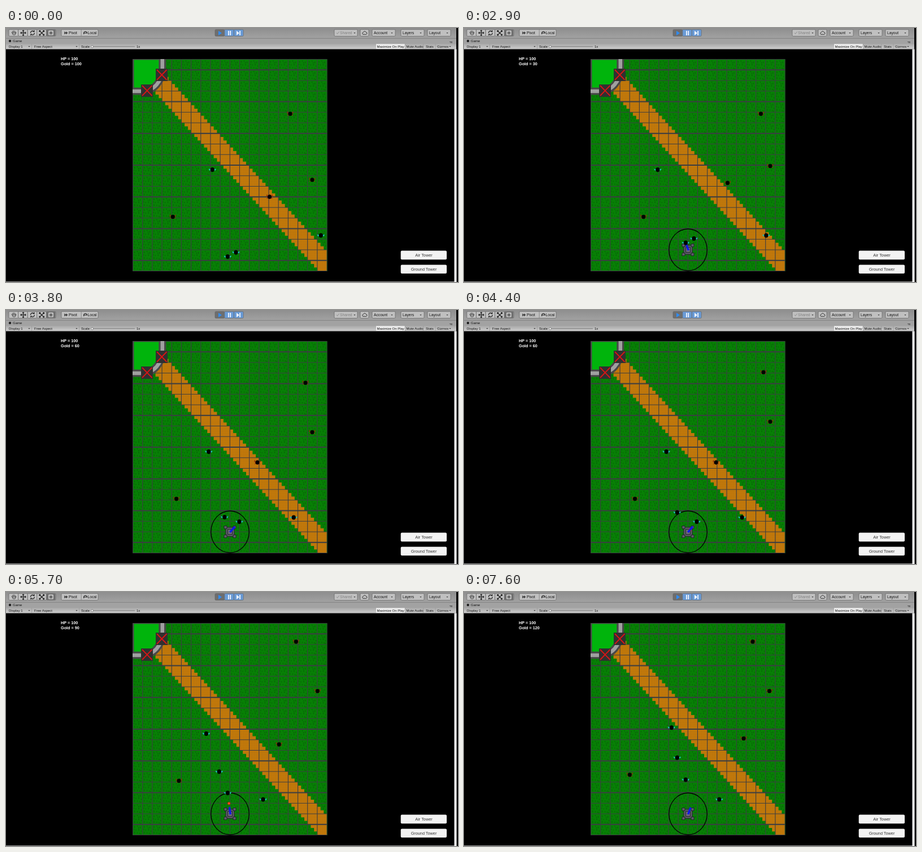
These frames come from a looping animation (800x450 px, 8000 ms). An HTML page:

```html
<!DOCTYPE html>
<html>
<head>
<meta charset="utf-8">
<style>
  html, body { margin: 0; width: 100%; height: 100%; overflow: hidden; background: #000; }
  svg { display: block; width: 800px; height: 450px; font: 6px "Liberation Sans", Arial, sans-serif; }
  .top { font-size: 6.7px; }
  .btn { fill: #c0c0c0; stroke: #636363; stroke-width: .7; }
  .on { fill: #6e6e6e; }
  .lit { fill: #6a9bd6; }
  .icon { fill: none; stroke: #222; stroke-width: 1.2; }
  .hud { font-size: 7.25px; font-weight: bold; fill: #fff; }
  .label { font-size: 7.3px; fill: #323232; text-anchor: middle; }
</style>
</head>
<body>
<svg viewBox="0 0 800 450">
  <defs>
    <linearGradient id="bar" x2="0" y2="1"><stop stop-color="#8e8e8e"/><stop offset="1" stop-color="#a2a2a2"/></linearGradient>
    <linearGradient id="strip" x2="0" y2="1"><stop stop-color="#a8a8a8"/><stop offset="1" stop-color="#cecece"/></linearGradient>
    <pattern id="grass" x="224.5" y="55.5" width="17.18" height="18.75" patternUnits="userSpaceOnUse">
      <rect width="18" height="19" fill="#078005"/>
      <path d="M3 3v3M8 2v2M13 4v3M5.5 9v2M10.5 8v3M15 11v2M3 13v3M8 14v2M12 15v2M10 5v2M2 8v2M14 16v2" stroke="#065207" stroke-width=".9"/>
    </pattern>
    <pattern id="dirt" x="224.5" y="55.5" width="2.86" height="3.12" patternUnits="userSpaceOnUse">
      <rect width="3" height="4" fill="#c47a0a"/>
      <path d="M1 0v2" stroke="#a8680c" stroke-width=".8"/>
    </pattern>
    <clipPath id="field"><rect x="224" y="55" width="344.6" height="376"/></clipPath>
    <g id="flyer">
      <path d="M-6.8-1.6L-3-1V1.6L-5.5 1.2ZM6.8-1.6L3-1V1.6L5.5 1.2Z" fill="#1cc0bc"/>
      <ellipse rx="3.6" ry="4" fill="#000"/>
    </g>
    <g id="walker">
      <path d="M-2.5 0L-5-1.2L-4.4-4M2.5 0L5-1.2L4.4-4M-2.5 1.5L-4.8 3M2.5 1.5L4.8 3" fill="none" stroke="#94290c" stroke-width="1.2"/>
      <ellipse rx="3.5" ry="3.7" fill="#000"/>
    </g>
  </defs>

  <rect width="800" height="450" fill="#000"/>
  <path d="M0 449h797v1H0z" fill="#999"/>

  <!-- editor bars -->
  <rect width="797" height="18.2" fill="url(#bar)"/>
  <rect y="18.2" width="797" height="10" fill="#a2a2a2"/>
  <path d="M0 18.2H797" stroke="#868686" stroke-width=".7"/>
  <rect y="28" width="797" height="9.5" fill="url(#strip)"/>
  <path d="M0 37.3H797" stroke="#777" stroke-width=".6"/>
  <path d="M793.5 37.5h4V450h-4z" fill="#fff"/>
  <rect x="655" y="28.3" width="51" height="8.7" fill="#ececec"/>
  <path d="M706.3 28v9M738.5 28v9M760 28v9M45.5 28v9M129.5 28v9" stroke="#999" stroke-width=".7"/>

  <g id="buttons"></g>
  <path class="on" d="M71.5 3h16v11h-16z"/>
  <g class="icon">
    <path d="M11 9L10 7M12 8V5M14 8V4.5M16 8V5.5M17.5 9V7M11 9L12.5 12H16L17.5 9Z" stroke-width=".8"/>
    <path d="M26 8.7H35M30.5 4.2V13.2M27.5 7L26 8.7L27.5 10.4M33.5 7L35 8.7L33.5 10.4M29 5.5L30.5 4L32 5.5M29 12L30.5 13.4L32 12"/>
    <path d="M43.5 9A3.5 3.5 0 0 1 49 5.8M50.3 8.5A3.5 3.5 0 0 1 45 11.7M47.5 6.5H50V4M46.3 11H43.7V13.2"/>
    <path d="M59.5 5L67 12.5M67 5L59.5 12.5M59 7V4.5H61.5M65 4.5H67.5V7M59 10.5V13H61.5M65 13H67.5V10.5"/>
    <path d="M76 5.3H83V12H76Z" stroke="#eee"/>
    <path d="M104 6.5V11M107 6.5V11M104 8.7H109M138 11A3 3 0 1 1 143.5 9H138"/>
    <path d="M632 11.3A2 2 0 0 1 632.5 7.5A2.4 2.4 0 0 1 637 7.4A2 2 0 0 1 637.5 11.3Z" stroke-width=".9"/>
    <path d="M585 8.5L586.5 10.5L589.5 6.5" stroke="#888" stroke-width=".9"/>
  </g>
  <path d="M376 5L382 9L376 13Z" fill="#2f8cf5"/>
  <path d="M393 5h1.8v8H393zM396.3 5h1.8v8h-1.8zM408 5L413 9L408 13ZM413.3 5h1.7v8h-1.7z" fill="#f4f8ff"/>
  <path d="M133.2 2.5V14.5" stroke="#777" stroke-width=".7"/>
  <path d="M153 33H228" stroke="#777" stroke-width="1"/>
  <circle cx="152.5" cy="33" r="2" fill="#eee" stroke="#555" stroke-width=".6"/>
  <circle cx="7" cy="23" r="2.2" fill="#222"/>
  <path d="M785 24.5H790M786.5 26H790" stroke="#333" stroke-width=".7"/>
  <g id="arrows"></g>
  <g class="top" fill="#111">
    <text x="111" y="11.2">Pivot</text><text x="144.5" y="11.2">Local</text>
    <text x="591" y="11.2" fill="#818181">Shared</text>
    <text x="651" y="11.2">Account</text><text x="702" y="11.2">Layers</text><text x="749" y="11.2">Layout</text>
  </g>
  <g fill="#111">
    <text x="12" y="25.3">Game</text><text x="5" y="34.6">Display 1</text>
    <text x="50" y="34.6">Free Aspect</text><text x="133" y="34.6">Scale</text><text x="231" y="34.6">1x</text>
    <text x="656.5" y="34.6">Maximize On Play</text><text x="708.5" y="34.6">Mute Audio</text>
    <text x="743" y="34.6">Stats</text><text x="763" y="34.6">Gizmos</text>
  </g>

  <!-- map -->
  <g clip-path="url(#field)">
    <rect x="224" y="55" width="345" height="376" fill="url(#grass)"/>
    <path id="road" fill="url(#dirt)"/>
    <g fill="none" stroke="#3b3d42">
      <path id="grid" stroke-width="1.1"/>
      <path id="seams" stroke-width="1.8"/>
    </g>
    <path d="M220 50H276.8V70C276.8 95 262 112 240 112H220Z" fill="#00b40c" stroke="#484848" stroke-width="13"/>
    <path d="M276.8 50V70C276.8 95 262 112 240 112H220" fill="none" stroke="#a0a0a0" stroke-width="6.5"/>
    <path d="M265 72h21v22h-21zM239 100h21v22h-21z" fill="#303030"/>
    <path d="M267 74L284.5 92M284.5 74L267 92M241 102L258.5 120M258.5 102L241 120" stroke="#dc1414" stroke-width="1.8"/>
  </g>

  <g id="tower">
    <ellipse cx="396.5" cy="393" rx="33.7" ry="37" fill="none" stroke="#000" stroke-width="1.3"/>
    <g fill="#5b5b66" stroke="#23232b" stroke-width="1">
      <path d="M389 385h15v16h-15z"/>
      <path d="M386 382.5h5v5h-5zM402 382.5h5v5h-5zM386 398.5h5v5h-5zM402 398.5h5v5h-5z"/>
      <path d="M392.5 388.5h8v9h-8z" fill="#6c6878"/>
    </g>
    <g id="shot"><circle r="2.6" fill="#e02010"/><circle r="1" fill="#ffb030"/></g>
    <path id="gun" d="M-1.8 1V-12H1.8V1Z" fill="#1018e8"/>
  </g>
  <g id="units"></g>

  <text class="hud" x="97" y="56.8">HP = 100</text>
  <text class="hud" x="97" y="66.3" id="gold"></text>
  <rect x="698.7" y="394.6" width="81.3" height="15.6" rx="2" fill="#f3f3f3"/>
  <rect x="698.7" y="419.4" width="81.3" height="15.6" rx="2" fill="#f3f3f3"/>
  <text class="label" x="739.5" y="405">Air Tower</text>
  <text class="label" x="739.5" y="429.8">Ground Tower</text>
</svg>
<script>
const $ = id => document.getElementById(id);
const LEFT = 224.5, TOP = 55.5, CW = 17.18, CH = 18.75;

$('buttons').innerHTML = [[5, 16.6, 5], [98, 65, 1], [370, 16.7, 1, 'on'], [386.7, 16.7, 2, 'lit'], [581, 41, 1], [627, 15, 1], [648, 41, 1], [699, 41, 1], [746, 41, 1]]
  .map(([x, w, n, state = '']) => Array.from({ length: n }, (_, i) =>
    `<rect class="btn ${state}" x="${x + i * w}" y="2.7" width="${w}" height="11.8" rx="1.5"/>`).join('')).join('');
$('arrows').innerHTML = [[617, 8], [683, 8], [734, 8], [781, 8], [41, 32], [125, 32], [786, 32]]
  .map(([x, y]) => `<path d="M${x - 1.6} ${y}h3.2l-1.6 2z" fill="#444"/>`).join('');

// Road: three stair steps per cell along the diagonal.
let road = '', grid = '', seams = '';
for (let r = 5; r < 60; r++) {
  const from = r - 2, to = Math.min(60, r + 6);
  road += `M${LEFT + from * CW / 3} ${TOP + r * CH / 3}h${(to - from) * CW / 3}v${CH / 3 + .1}h${(from - to) * CW / 3}z`;
}
for (let i = 0; i <= 20; i++) {
  const row = `M${LEFT} ${TOP + i * CH}h343.6`;
  grid += `M${LEFT + i * CW} ${TOP}v375` + row;
  if (i % 3 === 1) seams += row;
}
$('road').setAttribute('d', road);
$('grid').setAttribute('d', grid);
$('seams').setAttribute('d', seams);

// Every unit walks its route at the same speed, measured in cells.
const routes = [
  ['walker', '503,152 530,152 530,88 501,88 511,88'],
  ['walker', '542,269 542,175.5 555,175.5 534.7,175.5 540.5,175.5'],
  ['walker', '466.5,299 466.5,270 437,270 495,270 495,259.5'],
  ['walker', '295.3,334.5 322.5,334.5 293.5,334.5 322.8,334.5 293.3,334.5 293.3,323.7'],
  ['flyer', '365.3,251 338,251 367,251 337.7,251 367.3,251 367.3,240'],
  ['flyer', '557.3,367.5 442,367.5 452,367.5'],
  ['flyer', '407,397.5 407,367 377.3,367 377.3,293.3'],
  ['flyer', '392.3,405 392.3,375 421,375 392.3,375 392.3,332.5'],
];
const units = routes.map(([kind, route]) => {
  const points = route.split(' ').map(p => p.split(',').map(Number));
  const el = document.createElementNS('http://www.w3.org/2000/svg', 'use');
  el.setAttribute('href', '#' + kind);
  $('units').append(el);
  return { el, points };
});
const decoy = units[7];

function along(points, distance) {
  for (let i = 1; i < points.length; i++) {
    const [x, y] = points[i - 1], [u, v] = points[i];
    const length = Math.abs(u - x) / CW + Math.abs(v - y) / CH;
    if (distance <= length) {
      const k = distance / length;
      return [x + (u - x) * k, y + (v - y) * k];
    }
    distance -= length;
  }
  return points[points.length - 1];
}

function travelled(t) {
  if (t < 2900) return Math.max(0, Math.min(6, (t - 1000) / 100)) * .115;
  return 1.97 + .00166 * (Math.min(t, 6500) - 3300);
}

const hits = [3800, 4800, 5950], FLIGHT = 500;

function draw(now) {
  const t = Math.floor(now % 8000 / 100) * 100;
  const d = travelled(t);
  for (const { el, points } of units)
    el.setAttribute('transform', `translate(${along(points, d)})`);

  const built = t >= 2900;
  $('tower').style.display = built ? '' : 'none';
  $('gold').textContent = 'Gold = ' + (built ? 30 + 30 * hits.filter(h => t >= h).length : 100);

  const [x, y] = along(decoy.points, d);
  const angle = t < 5900 ? Math.atan2(x - 397, 393 - y) * 180 / Math.PI : 20;
  $('gun').setAttribute('transform', `translate(397 393) rotate(${angle})`);

  const hit = hits.find(h => t >= h - FLIGHT && t < h);
  $('shot').style.display = hit ? '' : 'none';
  if (hit) {
    const k = 1 - (hit - t) / FLIGHT;
    $('shot').setAttribute('transform', `translate(${397 + (x - 397) * k} ${393 + (y - 393) * k})`);
  }
  requestAnimationFrame(draw);
}
requestAnimationFrame(draw);
</script>
</body>
</html>
```
